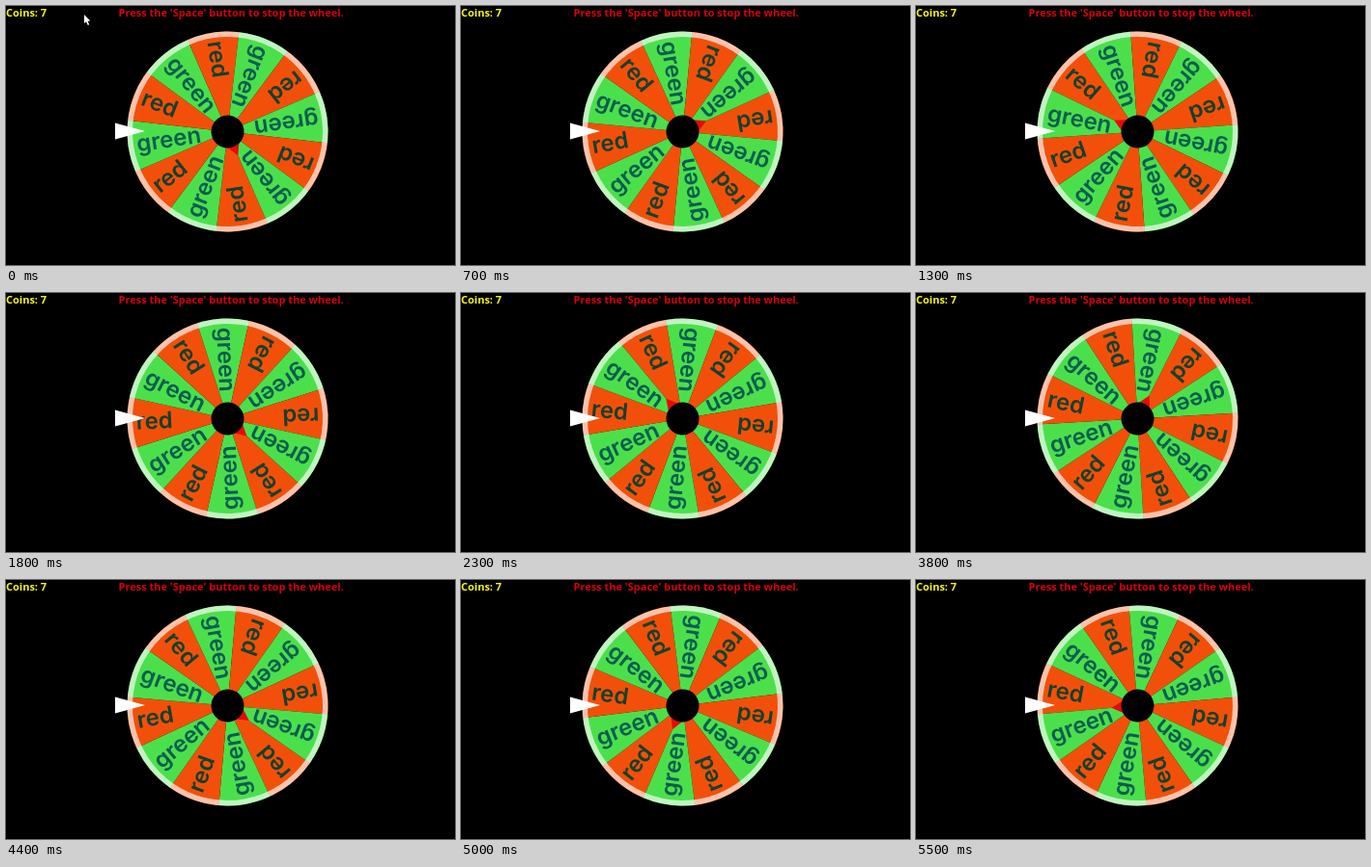
These frames come from a looping animation (465x269 px, 5600 ms). An HTML page with a canvas:

```html
<!DOCTYPE html>
<html lang="en">
<head>
<meta charset="utf-8">
<title>Wheel</title>
<style>
  html, body { margin: 0; width: 100%; height: 100%; overflow: hidden; background: #000; }
  canvas { display: block; }
</style>
</head>
<body>
<canvas id="stage" width="465" height="269"></canvas>
<script>
const ctx = document.getElementById('stage').getContext('2d');
const LOOP = 5600, STEP = 100;
const CENTER = [229.5, 130.5], RADIUS = 104, RING = 5.5, HUB = 17;
const SLICE = Math.PI / 6;

const KINDS = [
  { word: 'red', fill: '#f2500a', ink: '#14402c' },
  { word: 'green', fill: '#4be04b', ink: '#075c50' },
];

// Wheel angle in degrees at a few steps; the spin gradually slows down.
const KEYS = [[0, 66.5], [13, 566], [23, 950.5], [30, 1163.5], [38, 1376.7], [44, 1475], [55, 1615]];

function slope(i) {
  const [x0, y0] = KEYS[Math.max(i - 1, 0)];
  const [x1, y1] = KEYS[Math.min(i + 1, KEYS.length - 1)];
  return (y1 - y0) / (x1 - x0);
}

function wheelAngle(step) {
  let i = 0;
  while (i < KEYS.length - 2 && step >= KEYS[i + 1][0]) i++;
  const [x0, y0] = KEYS[i], [x1, y1] = KEYS[i + 1];
  const span = x1 - x0, u = (step - x0) / span, v = 1 - u;
  const degrees = v * v * (1 + 2 * u) * y0 + u * u * (3 - 2 * u) * y1
    + span * u * v * (v * slope(i) - u * slope(i + 1));
  return degrees * Math.PI / 180;
}

function polygon(fill, ...points) {
  ctx.fillStyle = fill;
  ctx.beginPath();
  for (const [x, y] of points) ctx.lineTo(x, y);
  ctx.fill();
}

function disc(fill, radius) {
  ctx.fillStyle = fill;
  ctx.beginPath();
  ctx.arc(0, 0, radius, 0, Math.PI * 2);
  ctx.fill();
}

function label(text, x, y, font, fill) {
  ctx.font = font;
  ctx.fillStyle = fill;
  ctx.fillText(text, x, y);
}

function drawWheel(angle) {
  ctx.save();
  ctx.translate(...CENTER);
  ctx.rotate(angle);
  for (let i = 0; i < 12; i++) {
    const { word, fill, ink } = KINDS[i % 2];
    ctx.save();
    ctx.rotate((i + 0.5) * SLICE);
    ctx.fillStyle = fill;
    ctx.beginPath();
    ctx.moveTo(0, 0);
    ctx.arc(0, 0, RADIUS, -SLICE / 2, SLICE / 2);
    ctx.fill();
    // Words read from the rim towards the hub.
    ctx.rotate(Math.PI);
    label(word, -95, 7, '600 24px Inter, sans-serif', ink);
    ctx.restore();
  }
  ctx.strokeStyle = 'rgba(255, 255, 255, 0.66)';
  ctx.lineWidth = RING;
  ctx.beginPath();
  ctx.arc(0, 0, RADIUS - RING / 2, 0, Math.PI * 2);
  ctx.stroke();
  polygon('#e60a0a', [27, 0], [14, -7], [14, 7]);
  disc('#000', HUB);
  ctx.restore();
}

function drawCursor(x, y) {
  polygon('#fff', [x, y], [x, y + 9], [x + 2, y + 7.3], [x + 3.8, y + 11],
    [x + 5.2, y + 10.3], [x + 3.6, y + 6.8], [x + 6.3, y + 6.5]);
}

function draw(now) {
  const step = Math.floor(now % LOOP / STEP);
  ctx.fillStyle = '#000';
  ctx.fillRect(0, 0, 465, 269);
  drawWheel(wheelAngle(step));
  polygon('#fff', [113, 121.5], [144, 130], [113, 138.5]);
  const font = '700 11px "Open Sans", sans-serif';
  label('Coins: 7', 0, 11, font, '#f4f41c');
  label("Press the 'Space' button to stop the wheel.", 116.5, 11, font, '#d6000c');
  if (step === 0) drawCursor(81, 9);
}

const start = performance.now();
function tick() {
  draw(performance.now() - start);
  requestAnimationFrame(tick);
}
tick();
</script>
</body>
</html>
```
